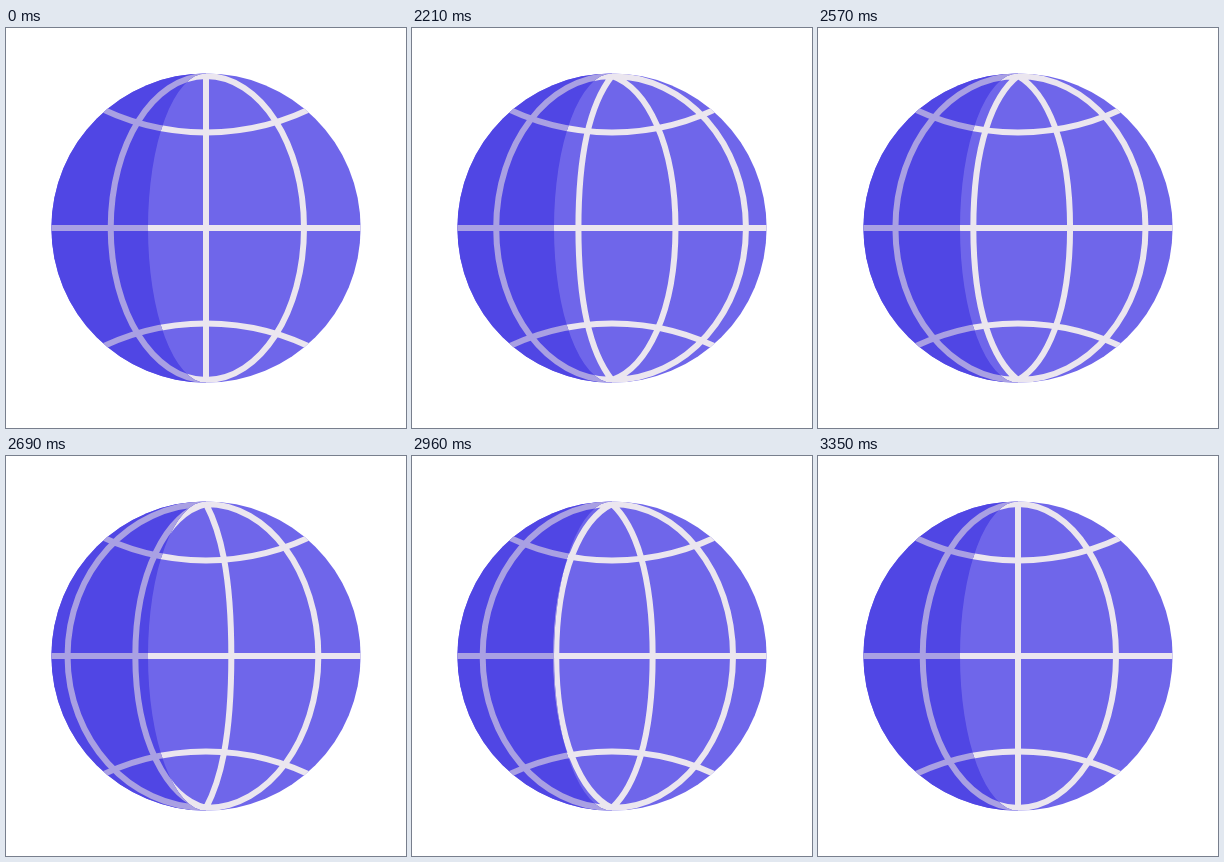
Animation of 400 by 400 pixels, one loop 3.44 s. Source, as an HTML page with a canvas:

```html
<!DOCTYPE html>
<html lang="en">
<head>
<meta charset="utf-8">
<title>Spinning globe</title>
<style>
  html, body { margin: 0; width: 100%; height: 100%; overflow: hidden; background: #fff; }
  canvas { display: block; width: 100vw; height: 100vh; }
</style>
</head>
<body>
<canvas id="stage"></canvas>
<script>
const SIZE = 400, CENTER = 200, RADIUS = 154.6, POLE = 152;
const LOOP = 3440, START = 2000, STEP = 30, STEPS = 45, TURNS = 7;
const STOPS = [-153.5, -95.3, 0, 98, 153.5]; // resting meridian offsets
const KAPPA = 0.5523;
const LIGHT = { fill: '#6f66ea', line: '#ebe6ef' };
const SHADE = { fill: '#5046e4', line: '#a9a0e3' };

const canvas = document.getElementById('stage');
const ctx = canvas.getContext('2d');

const lerp = (a, b, t) => a + (b - a) * t;

function bezier(a, b, t) {
  const u = 1 - t;
  return 3 * u * u * t * a + 3 * u * t * t * b + t * t * t;
}

// Quick start with a long, soft landing.
function ease(x) {
  if (x <= 0) return 0;
  if (x >= 1) return 1;
  let low = 0, high = 1;
  for (let i = 0; i < 30; i++) {
    const mid = (low + high) / 2;
    if (bezier(0.167, 0.458, mid) < x) low = mid; else high = mid;
  }
  return bezier(0.167, 1, low);
}

function globePath() {
  const path = new Path2D();
  path.arc(0, 0, RADIUS, 0, Math.PI * 2);
  return path;
}

// Everything left of a half ellipse that runs from pole to pole.
function shadePath() {
  const path = new Path2D();
  path.moveTo(-CENTER, -CENTER);
  path.lineTo(0, -CENTER);
  path.ellipse(0, 0, 58, RADIUS, 0, Math.PI * 1.5, Math.PI / 2, true);
  path.lineTo(0, CENTER);
  path.lineTo(-CENTER, CENTER);
  path.closePath();
  return path;
}

function gridPath() {
  const path = new Path2D();
  path.moveTo(-RADIUS - 2, 0);
  path.lineTo(RADIUS + 2, 0);
  const curve = 243, apex = 95.6;
  for (const side of [-1, 1]) {
    const mid = side * Math.PI / 2;
    path.moveTo(curve * Math.cos(-mid - 0.5), side * (apex + curve) + curve * Math.sin(-mid - 0.5));
    path.arc(0, side * (apex + curve), curve, -mid - 0.5, -mid + 0.5);
  }
  return path;
}

// The poles sharpen as a meridian straightens out.
function addMeridian(path, x) {
  const bend = Math.min(1, Math.abs(x) / 96);
  const top = POLE - 36 * (1 - bend), side = POLE * KAPPA;
  path.moveTo(0, -POLE);
  path.bezierCurveTo(x * KAPPA, -top, x, -side, x, 0);
  path.bezierCurveTo(x, side, x * KAPPA, top, 0, POLE);
}

function meridians(turn) {
  const path = new Path2D();
  const phase = turn % 1;
  for (let i = 0; i < STOPS.length - 1; i++) {
    const hidden = i === 0 && (turn < 0.2 || turn >= TURNS);
    if (!hidden) addMeridian(path, lerp(STOPS[i], STOPS[i + 1], phase));
  }
  return path;
}

const globe = globePath(), shade = shadePath(), grid = gridPath();

function paint({ fill, line }, lines) {
  ctx.fillStyle = fill;
  ctx.fill(globe);
  ctx.save();
  ctx.clip(globe);
  ctx.strokeStyle = line;
  ctx.lineWidth = 6;
  ctx.stroke(grid);
  ctx.stroke(lines);
  ctx.restore();
}

function draw(time) {
  const step = Math.max(0, Math.min(STEPS, Math.floor((time - START) / STEP)));
  const lines = meridians(TURNS * ease(step / STEPS));
  ctx.setTransform(canvas.width / SIZE, 0, 0, canvas.height / SIZE, 0, 0);
  ctx.fillStyle = '#fff';
  ctx.fillRect(0, 0, SIZE, SIZE);
  ctx.translate(CENTER, CENTER);
  paint(LIGHT, lines);
  ctx.save();
  ctx.clip(shade);
  paint(SHADE, lines);
  ctx.restore();
}

function resize() {
  const ratio = window.devicePixelRatio || 1;
  canvas.width = Math.round(innerWidth * ratio);
  canvas.height = Math.round(innerHeight * ratio);
}

const origin = performance.now();
function tick() {
  draw((performance.now() - origin) % LOOP);
  requestAnimationFrame(tick);
}

addEventListener('resize', resize);
resize();
tick();
</script>
</body>
</html>
```
